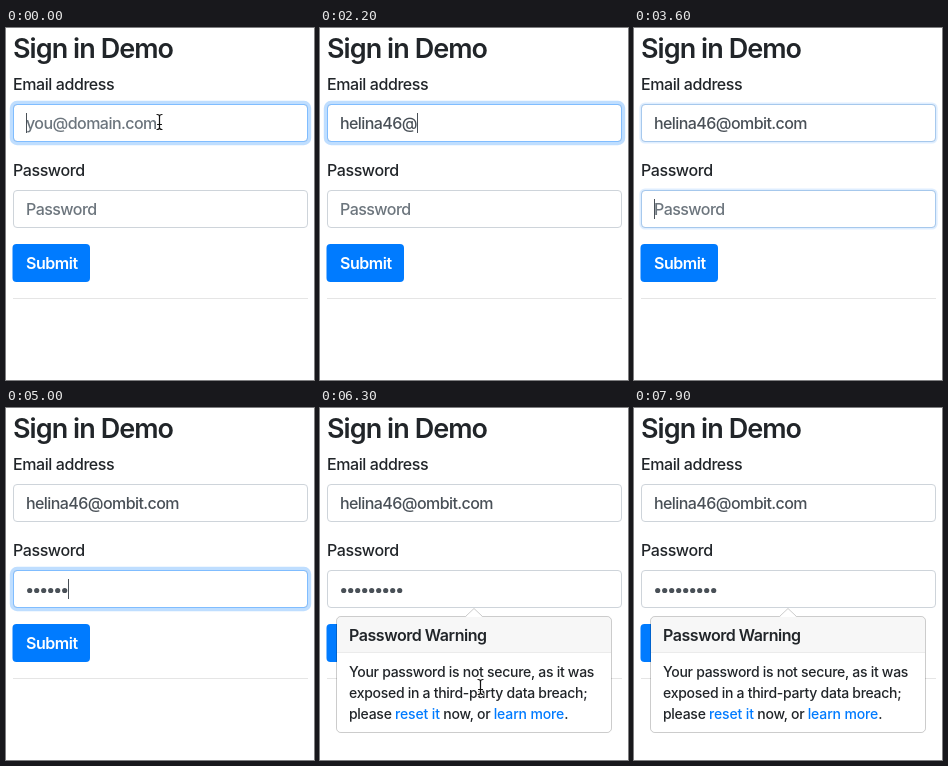
Recreate the animation shown at these times as an HTML page. Size 308x352 px, loop 8.3 s.

```html
<!DOCTYPE html>
<html lang="en">
<head>
<meta charset="utf-8">
<title>Sign in Demo</title>
<style>
  html, body { margin: 0; width: 100%; height: 100%; overflow: hidden; background: #fff; }
  svg { display: block; width: 308px; height: 352px; }
  text { font: 450 16px Inter, "Open Sans", sans-serif; letter-spacing: -.026em; fill: #212529; white-space: pre; }
  .title { font-size: 27px; font-weight: 600; letter-spacing: -.035em; }
  .strong { font-weight: 570; letter-spacing: -.028em; }
  .hint { fill: #6c757d; letter-spacing: -.034em; }
  .value { fill: #495057; letter-spacing: -.036em; }
  .small { font-size: 14px; letter-spacing: -.02em; }
  .link { fill: #007bff; font-weight: 550; letter-spacing: -.01em; }
  .link.hover { fill: #0056b3; text-decoration: underline; }
  .box { fill: #fff; stroke: #ced4da; }
  .ring { fill: none; stroke: #bfdeff; }
  .edge { fill: none; stroke: #80bdff; }
  .caret { fill: #495057; }
</style>
</head>
<body>
<svg viewBox="0 0 308 352">
  <text class="title" x="7" y="30">Sign in Demo</text>
  <text x="7" y="62">Email address</text>
  <text x="7" y="148">Password</text>

  <g id="email">
    <rect class="ring" x="7" y="76" width="295" height="38" rx="4"/>
    <rect class="box" x="7.5" y="76.5" width="294" height="37" rx="3.5"/>
    <rect class="edge" x="7.5" y="76.5" width="294" height="37" rx="3.5"/>
    <text class="hint" x="20" y="101">you@domain.com</text>
    <text class="value" x="20" y="101"></text>
    <rect class="caret" y="85" width="1" height="20"/>
  </g>

  <g id="password" transform="translate(0 86)">
    <rect class="ring" x="7" y="76" width="295" height="38" rx="4"/>
    <rect class="box" x="7.5" y="76.5" width="294" height="37" rx="3.5"/>
    <rect class="edge" x="7.5" y="76.5" width="294" height="37" rx="3.5"/>
    <text class="hint" x="20" y="101">Password</text>
    <g class="value"></g>
    <rect class="caret" y="85" width="1" height="20"/>
  </g>

  <rect x="6.5" y="216" width="77.5" height="38" rx="4" fill="#007bff"/>
  <text class="strong" x="20" y="241" style="fill:#fff">Submit</text>
  <rect x="7" y="270" width="295" height="1" fill="#e5e5e5"/>

  <g id="popover">
    <rect x="17" y="209" width="274" height="115" rx="4" fill="#fff"/>
    <path d="M17 244V213q0-4 4-4H287q4 0 4 4V244z" fill="#f7f7f7"/>
    <path d="M17 244.5H291" stroke="#ebebeb"/>
    <rect x="16.5" y="208.5" width="275" height="116" rx="4.3" fill="none" stroke="#000" stroke-opacity=".2"/>
    <path d="M145.5 209L154 200.5L162.5 209z" fill="#fff"/>
    <path d="M145.5 208.5L154 200.5L162.5 208.5" fill="none" stroke="#ccc"/>
    <text class="strong" x="29" y="233">Password Warning</text>
    <text class="small" x="29" y="269">Your password is not secure, as it was</text>
    <text class="small" x="29" y="290">exposed in a third-party data breach;</text>
    <text class="small" x="29" y="311">please <tspan class="link" id="reset">reset it</tspan> now, or <tspan class="link" id="learn">learn more</tspan>.</text>
  </g>

  <g id="cursor" stroke-linejoin="round" stroke-linecap="round">
    <g id="beam" fill="none">
      <path id="stem" d="M-2.5 -7.5Q0 -7.5 0 -5.5Q0 -7.5 2.5 -7.5M0 -5.5V5.5M-2 2.5H2M-2.5 7.5Q0 7.5 0 5.5Q0 7.5 2.5 7.5" stroke="#fff" stroke-width="2.6"/>
      <path d="M-2.5 -7.5Q0 -7.5 0 -5.5Q0 -7.5 2.5 -7.5M0 -5.5V5.5M-2 2.5H2M-2.5 7.5Q0 7.5 0 5.5Q0 7.5 2.5 7.5" stroke="#111" stroke-width="1.2"/>
    </g>
    <path id="arrow" d="M0 0V15L3.5 11.8L6 17.3L8.6 16.2L6.2 10.8H10.8z" fill="#000" stroke="#fff"/>
    <path id="hand" d="M-1.5 8V-2.5Q0 -4.5 1.5 -2.5V3Q3.5 2 4.5 4Q6.5 3 7.3 5Q9.5 4.5 9.5 7V10Q9.5 12 8 14V16H0V14L-5 8.5Q-5 6 -2.8 7z" fill="#fff" stroke="#000"/>
  </g>
</svg>
<script>
  const LOOP = 8300;
  const ADDRESS = 'helina46@ombit.com';
  const DOT_PITCH = 7;
  const RING = 3.2;
  const $ = (q, root = document) => root.querySelector(q);

  // Every track is a list of [start time, value...], held until the next entry.
  const emailKeys = [
    [0, 0], [200, 1], [300, 2], [900, 3], [1100, 4], [1200, 5], [1300, 6],
    [1700, 7], [1800, 8], [2200, 9], [2400, 11], [2600, 12], [2700, 13],
    [2800, 14], [3000, 15], [3100, 16], [3200, 17], [3400, 18]
  ];
  const passwordKeys = [
    [0, 0], [3900, 1], [4000, 2], [4100, 3], [4300, 4], [4400, 5],
    [5000, 6], [5100, 7], [5300, 8], [5500, 9]
  ];
  const caretTrack = [
    [0, 1], [300, 0], [1100, 1], [1500, 0], [1700, 1], [2000, 0], [2200, 1],
    [4100, 0], [4300, 1], [4700, 0], [5000, 1], [6000, 0]
  ];
  const emailFocus = [[0, 1], [3600, .5], [3700, 0]];
  const passwordFocus = [[0, 0], [3600, .5], [3700, 1], [6200, .5], [6300, 0]];
  const popoverTrack = [[0, 0], [6200, .5], [6300, 1]];
  const cursorTrack = [
    [0, 'beam', 153.5, 94], [200, ''],
    [5700, 'arrow', 155, 120], [5800, 'beam', 160, 168], [5900, 'arrow', 162, 216],
    [6000, 'arrow', 161, 256], [6100, 'arrow', 160, 272], [6200, 'beam', 160.5, 279],
    [6600, 'beam', 168, 287], [6700, 'hand', 205, 306], [6800, 'beam', 165, 307],
    [6900, 'beam', 130, 307], [7000, 'hand', 98, 306], [7500, 'beam', 212, 285], [7600, '']
  ];
  const hoverTrack = [[0, ''], [6700, 'learn'], [6800, ''], [7000, 'reset'], [7500, '']];

  const at = (track, t) => track.findLast(step => step[0] <= t).slice(1);
  const show = (el, on) => el.style.display = on ? '' : 'none';

  const email = $('#email'), password = $('#password');
  const dots = $('.value', password);
  for (let i = 0; i < 9; i++) {
    const dot = document.createElementNS(email.namespaceURI, 'circle');
    dot.setAttribute('cx', 23.7 + i * DOT_PITCH);
    dot.setAttribute('cy', 96.5);
    dot.setAttribute('r', 2.6);
    dots.append(dot);
  }

  // The ring grows and fades in together, as a box-shadow transition does.
  function drawField(field, focus, filled, caretX, caretOn) {
    const ring = $('.ring', field);
    ring.style.strokeWidth = 2 * RING * focus;
    ring.style.opacity = focus;
    $('.edge', field).style.opacity = focus;
    show($('.hint', field), !filled);
    const caret = $('.caret', field);
    caret.setAttribute('x', Math.round(caretX));
    show(caret, caretOn);
  }

  function draw(t) {
    const [caretOn] = at(caretTrack, t);
    const [typed] = at(emailKeys, t), [hidden] = at(passwordKeys, t);

    const value = $('.value', email);
    value.textContent = ADDRESS.slice(0, typed);
    const textWidth = typed ? value.getComputedTextLength() : 0;
    drawField(email, at(emailFocus, t)[0], typed, 20 + textWidth, caretOn && t < 3600);

    [...dots.children].forEach((dot, i) => show(dot, i < hidden));
    drawField(password, at(passwordFocus, t)[0], hidden, 20 + hidden * DOT_PITCH, caretOn && t >= 3600);

    $('#popover').style.opacity = at(popoverTrack, t)[0];
    const [hover] = at(hoverTrack, t);
    for (const id of ['reset', 'learn']) $('#' + id).classList.toggle('hover', id === hover);

    const [shape, x = 0, y = 0] = at(cursorTrack, t);
    $('#cursor').setAttribute('transform', `translate(${x} ${y})`);
    for (const id of ['beam', 'arrow', 'hand']) show($('#' + id), id === shape);
  }

  const start = performance.now();
  function tick() {
    draw((performance.now() - start) % LOOP);
    requestAnimationFrame(tick);
  }
  tick();
</script>
</body>
</html>
```
